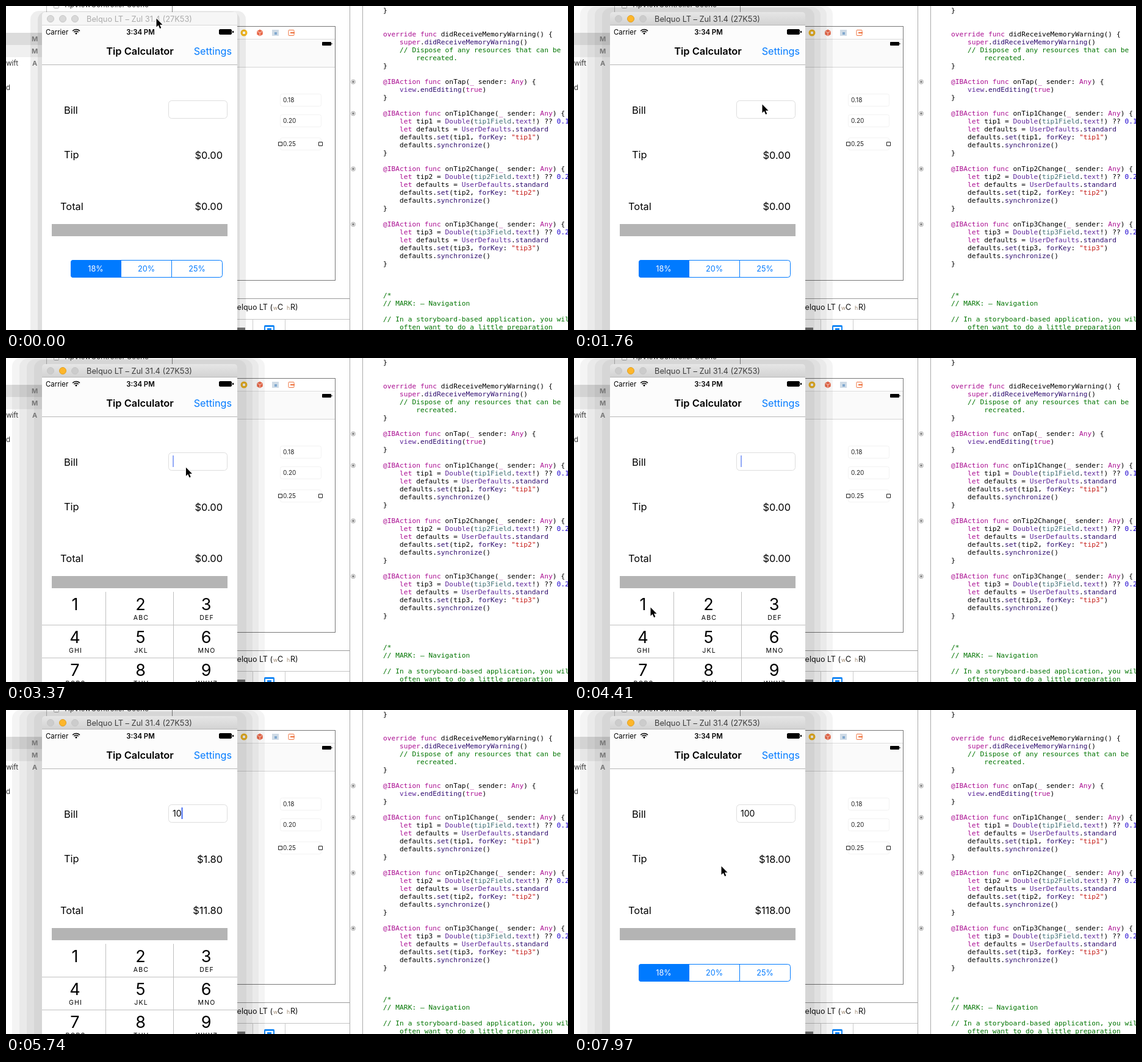
Recreate the animation shown at these times as an HTML page with a canvas. Size 921x532 px, loop 8 s.

```html
<!DOCTYPE html>
<html lang="en">
<head>
<meta charset="utf-8">
<title>Tip calculator demo</title>
<style>
html, body { margin: 0; width: 100%; height: 100%; overflow: hidden; background: #fff; }
canvas { display: block; }
</style>
</head>
<body>
<canvas id="stage" width="921" height="532"></canvas>
<script>
const ctx = document.getElementById('stage').getContext('2d');
const LOOP = 8000, TICK = 147;
const SANS = 'Inter, sans-serif', MONO = '"DejaVu Sans Mono", monospace';
const BLUE = '#007aff';

function text(str, x, y, size, color = '#000', align = 'left', weight = 400, family = SANS) {
  ctx.font = `${weight} ${size}px ${family}`;
  ctx.fillStyle = color;
  ctx.textAlign = align;
  ctx.fillText(str, x, y);
}
function rect(x, y, w, h, color) {
  ctx.fillStyle = color;
  ctx.fillRect(x, y, w, h);
}
function rounded(x, y, w, h, r, fill, stroke) {
  ctx.beginPath();
  ctx.roundRect(x, y, w, h, r);
  if (fill) { ctx.fillStyle = fill; ctx.fill(); }
  if (stroke) { ctx.strokeStyle = stroke; ctx.lineWidth = 1; ctx.stroke(); }
}
function circle(x, y, r, fill, stroke) {
  rounded(x - r, y - r, 2 * r, 2 * r, r, fill, stroke);
}
const hline = (x1, x2, y, color) => rect(x1, y, x2 - x1, 1, color);
const vline = (x, y1, y2, color) => rect(x, y1, 1, y2 - y1, color);
const clamp = v => Math.min(1, Math.max(0, v));
const progress = (tick, from, to) => clamp((tick - from) / (to - from));
const smooth = p => p * p * (3 - 2 * p);

// All moments below are counted in ticks
const ACTIVATE = 11, FOCUS = 13, DISMISS = 52;
const TYPED = [{ at: 31, bill: '1' }, { at: 39, bill: '10' }, { at: 41, bill: '100' }];
const MOVES = [
  { from: 4, to: 7, x: 324, y: 71 },
  { from: 8, to: 10, x: 308, y: 161 },
  { from: 22, to: 28, x: 125, y: 409 },
  { from: 33, to: 36, x: 215, y: 545 },
  { from: 45, to: 46, x: 258, y: 286 },
  { from: 46, to: 50, x: 241, y: 256 }
];

function pointerAt(tick) {
  let x = 246, y = 20;
  for (const move of MOVES) {
    const p = smooth(progress(tick, move.from, move.to));
    x += (move.x - x) * p;
    y += (move.y - y) * p;
  }
  return [x, y];
}
function caretAt(tick, lastInput) {
  if (tick < FOCUS || tick > DISMISS) return 0;
  const phase = Math.max(0, tick - lastInput - 1);
  return clamp(.8 + Math.cos((phase - 1) * 2 * Math.PI / 7));
}

const handler = n => `@IBAction func onTip${n}Change(_ sender: Any) {
    let tip${n} = Double(tip${n}Field.text!) ?? ${['0.18', '0.20', '0.25'][n - 1]}
    let defaults = UserDefaults.standard
    defaults.set(tip${n}, forKey: "tip${n}")
    defaults.synchronize()
}
`;
const CODE = `}


override func didReceiveMemoryWarning() {
    super.didReceiveMemoryWarning()
    // Dispose of any resources that can be
        recreated.
}

@IBAction func onTap(_ sender: Any) {
    view.endEditing(true)
}

${[1, 2, 3].map(handler).join('\n')}


/*
// MARK: – Navigation

// In a storyboard-based application, you will
    often want to do a little preparation`.split('\n');

function tokenColor(token) {
  if (/^(@IBAction|override|func|super|let|true|Any|_)$/.test(token)) return '#aa0d91';
  if (/^(view|Double|UserDefaults|text)$/.test(token)) return '#5c2699';
  if (/^(endEditing|set|forKey|synchronize|standard)$/.test(token)) return '#2e0d6e';
  if (/Field$/.test(token)) return '#3f6e74';
  if (/^"/.test(token)) return '#c41a16';
  if (/^\d/.test(token)) return '#1c00cf';
  return '#000';
}
function drawCode() {
  const advance = 6.773;
  CODE.forEach((line, row) => {
    const isComment = /^\s*(\/|recreated|often)/.test(line);
    let col = 0;
    for (const token of line.split(/("[^"]*"|\d+\.\d+|@?\w+)/)) {
      let color = isComment ? '#007400' : tokenColor(token);
      if (token === 'didReceiveMemoryWarning' && line.includes('super')) color = '#2e0d6e';
      text(token, 618 + col * advance, 11 + row * 13, 11.25, color, 'left', 400, MONO);
      col += token.length;
    }
  });
}

function drawNavigator() {
  rect(0, 44, 59, 20, '#dcdcdc');
  rect(0, 64, 59, 20, '#f0f0f0');
  text('wift', 20, 98, 11.5, '#333', 'right');
  text('rd', 7, 138, 11.5, '#333', 'right');
  vline(66, 0, 10, '#bbb');
  vline(272, 0, 10, '#888');
  rounded(78.5, -5.5, 8, 9, 1, null, '#aaa');
  text('TipViewController Scene', 94, 2, 12, '#333');
}

function drawCube(x, y, r) {
  const corner = i => [x + r * Math.sin(i * Math.PI / 3), y - r * Math.cos(i * Math.PI / 3)];
  ctx.beginPath();
  for (let i = 0; i < 6; i++) ctx.lineTo(...corner(i));
  ctx.fillStyle = '#e9694a';
  ctx.fill();
  ctx.beginPath();
  for (const i of [1, 3, 5]) {
    ctx.moveTo(x, y);
    ctx.lineTo(...corner(i));
  }
  ctx.strokeStyle = '#fbd5ca';
  ctx.lineWidth = 1;
  ctx.stroke();
}

function drawSceneIcons() {
  circle(390, 44, 5.5, '#f5b921');
  rect(388, 42, 4, 4, '#fff');
  drawCube(416, 44, 5.5);
  rect(436, 39, 11, 10, '#cfdbe6');
  rect(440, 43, 4, 4, '#82a9cf');
  rounded(463, 39.5, 9, 9, 1, null, '#ee7440');
  rect(466, 43, 7, 2, '#ee7440');
}

function drawStoryboard() {
  ctx.strokeStyle = '#777';
  ctx.lineWidth = 1;
  ctx.strokeRect(300.5, 33.5, 239, 417);
  rect(379, 55, 160, 45, '#fafafa');
  hline(379, 539, 54, '#ddd');
  hline(379, 539, 100, '#d4d4d4');
  drawSceneIcons();

  rounded(518, 59, 15, 6, 1, '#000');
  rect(533.5, 61, 1, 2, '#000');
  [['0.18', 154], ['0.20', 188], ['0.25', 226]].forEach(([value, y]) => {
    rounded(449.5, y - 9.5, 67, 20, 3, null, '#f2f2f2');
    text(value, 454, y + 4, 10, '#222');
  });
  for (const x of [446.5, 512.5]) rounded(x, 223.5, 6, 6, 0, '#fff', '#222');

  hline(379, 563, 480, '#999');
  text('Belquo LT (', 437, 498.5, 12.5, '#111', 'right');
  text('w', 438, 498.5, 9, '#a08a72');
  text('C', 445, 498.5, 12.5, '#111');
  text('h', 460, 498.5, 9, '#a08a72');
  text('R)', 466, 498.5, 12.5, '#111');
  hline(379, 563, 514, '#c4c4c4');
  vline(404, 515, 532, '#ccc');
  vline(457, 515, 532, '#ccc');
  rect(379, 528, 13, 4, '#777');
  rounded(423, 524, 17, 14, 2, '#1687f5');
  rect(425, 527, 13, 5, '#fff');
  rect(428, 529, 7, 3, '#1687f5');

  vline(563, 0, 532, '#aaa');
  vline(584, 0, 532, '#aaa');
  CODE.forEach((line, row) => {
    if (!line.startsWith('@IBAction')) return;
    circle(569, 7.5 + row * 13, 3.5, null, '#aaa');
    circle(569, 7.5 + row * 13, 2, '#888');
  });
}

function drawShadow(active) {
  const [layers, left, right, top, alpha] = active ? [4, 10, 424, 0, .045] : [2, 40, 393, 8, .065];
  for (let i = 0; i < layers; i++)
    rounded(left + 12 * i, top + i, right - left - 22 * i, 600, [14, 14, 0, 0], `rgba(0,0,0,${alpha})`);
}

function drawTitleBar(active) {
  const fill = ctx.createLinearGradient(0, 10, 0, 32);
  fill.addColorStop(0, active ? '#e6e6e6' : '#f6f6f6');
  fill.addColorStop(1, active ? '#d2d2d2' : '#f6f6f6');
  rounded(59, 10, 320, 30, [5, 5, 0, 0], fill);
  hline(59, 379, 31, active ? '#b8b8b8' : '#dadada');
  for (let i = 0; i < 3; i++) {
    const lit = active && i === 1;
    circle(73 + 20 * i, 21, 5.5, lit ? '#fdb62b' : active ? '#ccc' : '#d9d9d9', lit ? '#dfa023' : '#c6c6c6');
  }
  text('Belquo LT – Zul 31.4 (27K53)', 218.5, 25.5, 12.8, active ? '#3c3c3c' : '#ababab', 'center');
}

function drawStatusBar() {
  text('Carrier', 65, 46.5, 11.4);
  ctx.strokeStyle = '#000';
  ctx.lineWidth = 1.6;
  for (const r of [8, 5]) {
    ctx.beginPath();
    ctx.arc(115, 46.5, r, -Math.PI * .76, -Math.PI * .24);
    ctx.stroke();
  }
  circle(115, 45, 1.5, '#000');
  text('3:34 PM', 220.5, 46.5, 11.4, '#000', 'center', 600);
  rounded(349.5, 38.5, 20, 8, 1.5, '#000', '#000');
  rect(371, 41, 2, 3, '#000');
}

function drawApp(bill, caret) {
  rect(59, 32, 320, 500, '#fff');
  rect(59, 32, 320, 64, '#fcfcfc');
  hline(59, 379, 96, '#b6b6b6');
  drawStatusBar();
  text('Tip Calculator', 219.5, 80, 16.4, '#000', 'center', 600);
  text('Settings', 370, 80, 16.2, BLUE, 'right');

  const money = n => '$' + n.toFixed(2);
  const amount = Number(bill);
  text('Bill', 95, 176.5, 16.4);
  text('Tip', 95, 249.5, 16.4);
  text('Total', 89, 334.5, 16.4);
  text(money(amount * .18), 355, 250.5, 16.4, '#000', 'right');
  text(money(amount * 1.18), 355, 334.5, 16.4, '#000', 'right');

  rounded(266.5, 155.5, 96, 29, 5, '#fff', '#dddddd');
  text(bill, 273, 175, 14);
  ctx.globalAlpha = caret;
  rect(273 + ctx.measureText(bill).width, 160, 2, 19, '#426bf2');
  ctx.globalAlpha = 1;

  rect(75, 358, 288, 20, '#b4b4b4');
  rounded(106.5, 417.5, 248, 28, 4, '#fff', BLUE);
  rounded(106, 417, 82.5, 29, [4, 0, 0, 4], BLUE);
  vline(188, 417, 446, BLUE);
  vline(271, 417, 446, BLUE);
  ['18%', '20%', '25%'].forEach((label, i) =>
    text(label, 147 + 83 * i, 436, 12.6, i ? BLUE : '#fff', 'center'));
}

function drawKeyboard(shown, pressed) {
  ctx.save();
  ctx.translate(0, 384 + 216 * (1 - shown));
  rect(59, 0, 320, 216, '#fff');
  if (pressed) rect(59, 0, 104, 54, '#d0d4da');
  vline(163, 0, 216, '#c0c0c0');
  vline(274, 0, 216, '#c0c0c0');
  [' ', 'ABC', 'DEF', 'GHI', 'JKL', 'MNO', 'PQRS', 'TUV', 'WXYZ'].forEach((letters, key) => {
    const x = 113 + 107.5 * (key % 3), y = 54 * Math.floor(key / 3);
    hline(59, 379, y + 54, '#c0c0c0');
    text(key + 1, x, y + 30, 27, '#000', 'center');
    ctx.letterSpacing = '1.2px';
    text(letters, x + 1, y + 45.5, 10.5, '#000', 'center');
    ctx.letterSpacing = '0px';
  });
  ctx.restore();
}

const ARROW = new Path2D('M0 0V14L3.2 11L5.6 16.4L7.8 15.4L5.5 10.2H10Z');
function drawPointer([x, y]) {
  ctx.save();
  ctx.translate(x + .5, y + .5);
  ctx.strokeStyle = '#fff';
  ctx.lineWidth = 2;
  ctx.lineJoin = 'round';
  ctx.stroke(ARROW);
  ctx.fillStyle = '#000';
  ctx.fill(ARROW);
  ctx.restore();
}

function draw(time) {
  const tick = Math.floor((time % LOOP + 20) / TICK);
  const active = tick >= ACTIVATE;
  const input = TYPED.findLast(key => tick >= key.at) || { at: FOCUS + 3, bill: '' };
  const rise = 1 - (1 - progress(tick, FOCUS, FOCUS + 3)) ** 3;
  const fall = progress(tick, DISMISS, DISMISS + 2);

  rect(0, 0, 921, 532, '#fff');
  drawNavigator();
  drawStoryboard();
  drawCode();
  drawShadow(active);
  ['M', 'M', 'A'].forEach((flag, i) => text(flag, 47, 58 + 20 * i, 11, '#777', 'center', 700));
  drawTitleBar(active);
  drawApp(input.bill, caretAt(tick, input.at));
  drawKeyboard(rise * (1 - fall), tick === TYPED[0].at);
  drawPointer(pointerAt(tick));
}

const start = performance.now();
(function loop() {
  draw(performance.now() - start);
  requestAnimationFrame(loop);
})();
</script>
</body>
</html>
```
